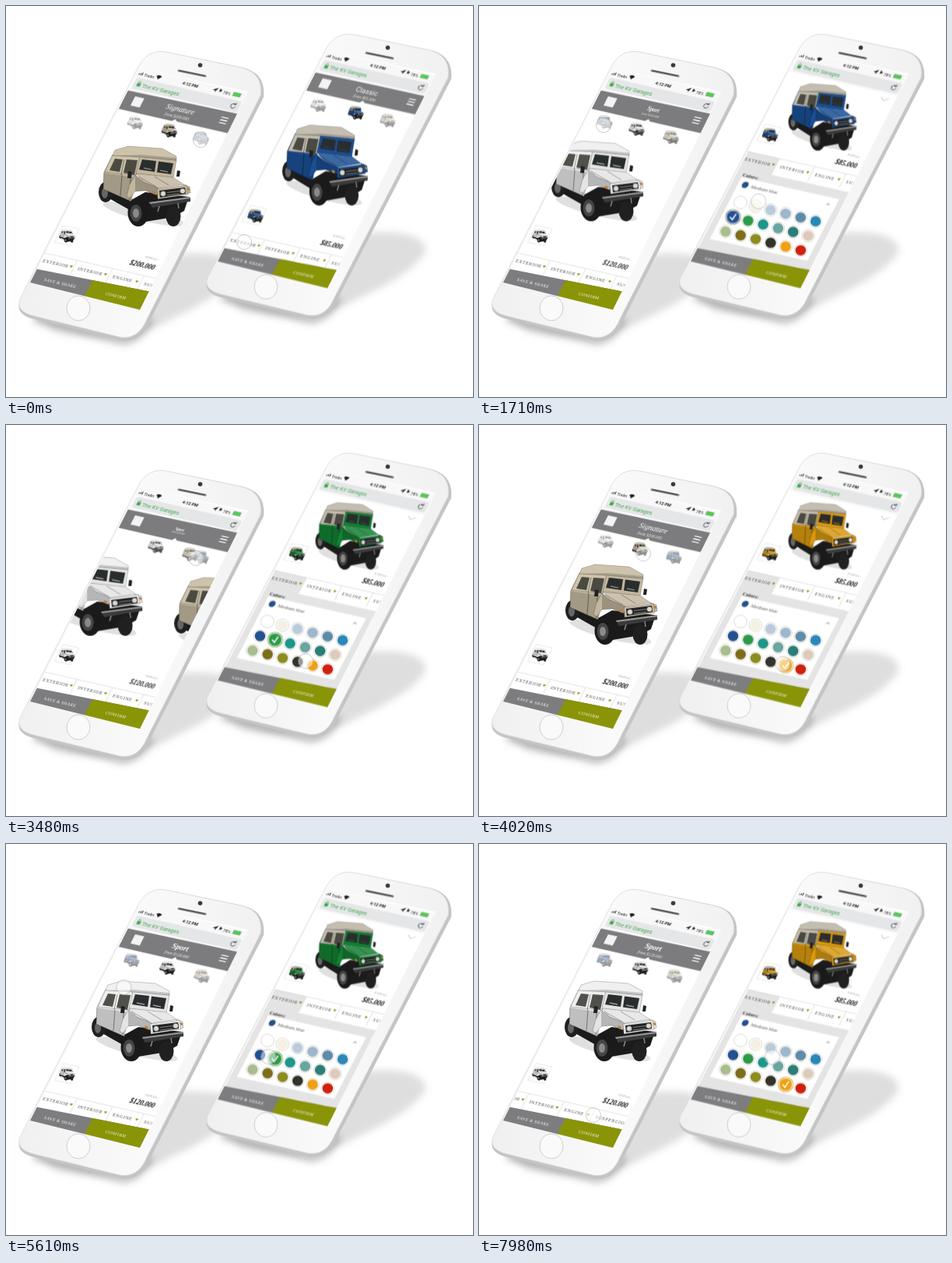
Recreate the animation shown at these times as an HTML page. Size 600 by 502 pixels, loop 8000 ms.

```html
<!DOCTYPE html>
<html lang="en">
<head>
<meta charset="utf-8">
<title>Car configurator on two phones</title>
<style>
html, body { margin: 0; width: 100%; height: 100%; overflow: hidden; background: #fff; }
svg { display: block; width: 100vw; height: 100vh; }
text { font-family: "Liberation Serif", serif; }
.sans { font-family: Roboto, Arial, sans-serif; }
.mid { text-anchor: middle; }
.tab { font-size: 5.6px; letter-spacing: .8px; fill: #444; }
.btn { font-size: 5.2px; letter-spacing: .45px; fill: #fff; text-anchor: middle; }
.title { font-size: 9.5px; font-style: italic; font-weight: bold; fill: #fff; text-anchor: middle; }
.sub { font-size: 5.4px; font-style: italic; fill: #eee; text-anchor: middle; }
.price { font-size: 8.6px; font-style: italic; font-weight: bold; fill: #111; text-anchor: end; }
.label { font-size: 6.6px; font-weight: bold; fill: #333; }
.value { font-size: 6.5px; fill: #555; }
.hint { font-size: 5.4px; font-style: italic; fill: #c4c4c4; }
.beige { color: #c2b79e; --top: #cdc3ab; }
.white { color: #e4e4e4; --top: #f0f0f0; }
.blue { color: #1b4f94; --top: #c4beb0; }
.panel { fill: currentColor; stroke: #000; stroke-opacity: .3; stroke-width: .7; }
.touch { fill: #fff; fill-opacity: .5; stroke: #aaa; stroke-opacity: .75; stroke-width: .8; }

.cars, .thumbs, .side, .sport, .signature, .first, .second, .strip, .hand1, .hand2,
.lift, .hero, .away, .reveal, .paint, .menu, .pick { animation: 8s linear infinite; }

.cars { animation-name: cars; }
@keyframes cars {
  0% { transform: translate(-150px, -24px); animation-timing-function: ease-out; }
  1.9%, 15.6% { transform: translate(-158px, -25px); animation-timing-function: ease-in-out; }
  23.1%, 40.5% { transform: none; animation-timing-function: ease-in-out; }
  48%, 62.5% { transform: translate(-158px, -25px); animation-timing-function: ease-in-out; }
  70%, 100% { transform: none; }
}
.thumbs { animation-name: thumbs; }
@keyframes thumbs {
  0% { transform: translate(-41.5px, -9.5px); animation-timing-function: ease-out; }
  1.9%, 15.6% { transform: translate(-44.5px, -10.2px); animation-timing-function: ease-in-out; }
  23.1%, 40.5% { transform: none; animation-timing-function: ease-in-out; }
  48%, 62.5% { transform: translate(-44.5px, -10.2px); animation-timing-function: ease-in-out; }
  70%, 100% { transform: none; }
}
.side { animation-name: side; animation-timing-function: step-end; }
@keyframes side {
  0%, 42% { transform: translate(89px, 20.4px); }
  18%, 64.5%, 100% { transform: none; }
}
.first { animation-name: first; }
@keyframes first {
  0%, 15.6%, 48%, 62.5% { opacity: var(--off); }
  23.1%, 40.5%, 70%, 100% { opacity: 1; }
}
.second { animation-name: second; }
@keyframes second {
  0%, 15.6%, 48%, 62.5% { opacity: 1; }
  23.1%, 40.5%, 70%, 100% { opacity: var(--off); }
}
.sport { animation-name: sport; }
@keyframes sport {
  0%, 19.4%, 44.3%, 66.1% { transform: scale(.4); opacity: 0; }
  19.5%, 44.2%, 66.2% { transform: scale(.4); opacity: 1; }
  23.1%, 40.5%, 70%, 100% { transform: none; opacity: 1; }
}
.signature { animation-name: signature; }
@keyframes signature {
  0%, 15.6%, 48%, 62.5% { transform: none; opacity: 1; }
  19.4%, 44.3%, 66.1% { transform: scale(.4); opacity: 1; }
  19.5%, 44.2%, 66.2%, 100% { transform: scale(.4); opacity: 0; }
}
.strip { animation-name: strip; }
@keyframes strip {
  0%, 91.9% { transform: none; }
  100% { transform: translate(-29px, 0); }
}
.hand1 { animation-name: hand1; }
@keyframes hand1 {
  0%, 3.7% { transform: translate(250px, 172px); }
  11.25% { transform: translate(177px, 162px); }
  14.4%, 28.7% { transform: translate(160px, 153px); }
  39.4%, 45% { transform: translate(244px, 171px); }
  59.4%, 67.5% { transform: translate(154px, 155px); }
  84.75% { transform: translate(137px, 344px); }
  89.4%, 91.9% { transform: translate(174px, 353px); }
  100% { transform: translate(146px, 348px); }
}
.hand2 { animation-name: hand2; }
@keyframes hand2 {
  0%, 3.1% { transform: translate(306px, 303px); }
  11.25% { transform: translate(332px, 285px); }
  15.6%, 18.7% { transform: translate(365px, 240px); }
  27.5%, 31.2% { transform: translate(346px, 275px); }
  43.5% { transform: translate(385px, 303px); }
  45.6%, 49.4% { transform: translate(393px, 309px); }
  60% { transform: translate(361px, 282px); }
  62%, 65% { transform: translate(346px, 275px); }
  76%, 85% { transform: translate(327px, 271px); }
  91.2%, 94.4% { transform: translate(393px, 309px); }
  100% { transform: translate(376px, 272px); }
}
.lift { animation-name: lift; }
@keyframes lift {
  0%, 3.1% { transform: none; animation-timing-function: ease-in-out; }
  9.4%, 100% { transform: translate(0, -108px); }
}
.hero { animation-name: hero; }
@keyframes hero {
  0%, 3.1% { transform: translate(112px, 176px) scale(.93, 1.02); animation-timing-function: ease-in-out; }
  9.4%, 100% { transform: translate(155px, 122px) scale(.74, .85); }
}
.away { animation-name: away; }
@keyframes away {
  0%, 3.1% { transform: none; opacity: 1; }
  8%, 100% { transform: translate(0, -24px); opacity: 0; }
}
.reveal { animation-name: reveal; }
@keyframes reveal { 0%, 6% { opacity: 0; } 9.4%, 100% { opacity: 1; } }
.menu { animation-name: menu; }
@keyframes menu { 0%, 17.5% { opacity: 0; } 20.5%, 100% { opacity: 1; } }
.paint { animation-name: paint; }
@keyframes paint {
  0%, 30%, 82%, 92.8% { color: #1b4f94; }
  32%, 46.2%, 64.5%, 80% { color: #148034; }
  48.2%, 62.5%, 94.8%, 100% { color: #d9990f; }
}
.pick { animation-timing-function: step-end; }
.pick.b { animation-name: pickBlue; }
.pick.g { animation-name: pickGreen; }
.pick.o { animation-name: pickOrange; }
@keyframes pickBlue { 0%, 80% { opacity: 1; } 30%, 93%, 100% { opacity: 0; } }
@keyframes pickGreen { 0%, 46.2%, 80%, 100% { opacity: 0; } 30%, 62.5% { opacity: 1; } }
@keyframes pickOrange { 0%, 62.5% { opacity: 0; } 46.2%, 93%, 100% { opacity: 1; } }
</style>
</head>
<body>
<svg viewBox="0 0 600 502">
<defs>
  <clipPath id="screen"><path d="M171 80L311 110L172 390L31 355Z"/></clipPath>
  <filter id="blur" x="-30%" y="-30%" width="160%" height="160%"><feGaussianBlur stdDeviation="5"/></filter>
  <linearGradient id="shell" x1="0" y1="0" x2="1" y2="0">
    <stop offset="0" stop-color="#f0f0f1"/><stop offset=".5" stop-color="#fafafa"/><stop offset="1" stop-color="#f1f1f2"/>
  </linearGradient>

  <g id="car">
    <ellipse cx="60" cy="88" rx="54" ry="9" transform="rotate(14 60 88)" opacity=".12"/>
    <path d="M8 54L44 70L62 60L118 66L112 84L98 92L62 98L44 84L12 66Z" fill="#1b1b1b"/>
    <ellipse cx="98" cy="91" rx="9.500" ry="13" fill="#202020"/>
    <ellipse cx="11" cy="60" rx="9" ry="13" fill="#202020"/>
    <ellipse cx="10" cy="61" rx="4" ry="7" fill="#666"/>
    <path class="panel" d="M20 12L54 14L49 46L44 72L8 56L9 34Z"/>
    <path class="panel" style="fill:var(--top)" d="M20 12L55 14L50 38L10 34Z"/>
    <path d="M8 35L48 41L44 72L8 56Z" opacity=".16"/>
    <path d="M23 17L33 18L29 34L16 32ZM38 18L52 19L48 38L34 35Z" fill="#35352f" opacity=".85"/>
    <path d="M32 38L30 65M35 18L31 38M43 42L42 70" stroke="#000" stroke-opacity=".4" fill="none"/>
    <path class="panel" d="M55 14L102 19L98 42L50 36Z"/>
    <path d="M58 18L76 20L74 34L54 31ZM79 20.500L98 23L95 37L77 34.500Z" fill="#2a2d2e"/>
    <path d="M60 29L70 31M81 32L91 34" stroke="currentColor" stroke-width="1.500" opacity=".6"/>
    <path class="panel" style="fill:var(--top)" d="M20 13L23 6L40 1L84 4L102 14L102 19L56 15Z"/>
    <path d="M20 13L56 15L102 19L102 16L56 12Z" opacity=".18"/>
    <path class="panel" d="M50 36L98 41L111 50L79 55L60 47Z"/>
    <path d="M50 36L98 41L111 50L79 55L60 47Z" fill="#fff" opacity=".14"/>
    <path d="M74 40L92 51M53 40L76 53" stroke="#000" stroke-opacity=".3"/>
    <path class="panel" d="M49 38L60 47L79 55L77 64L62 58L49 59L42 68L38 65L42 50Z"/>
    <path d="M49 38L60 47L79 55L77 64L62 58L49 59Z" opacity=".2"/>
    <path class="panel" d="M111 50L119 53L120 61L113 62Z"/>
    <path class="panel" d="M77 56L115 51L117 63L78 69Z"/>
    <path d="M80 58L113 54L114 62L81 67Z" fill="#222"/>
    <path d="M90 60.500L106 58.500M90 64L106 62" stroke="#999" stroke-width=".8"/>
    <circle cx="85" cy="62" r="3.600" fill="#d9d9d4" stroke="#444"/>
    <circle cx="110" cy="58.500" r="3.600" fill="#d9d9d4" stroke="#444"/>
    <path d="M71 58L75 60L74 63L70 61ZM116 54L119 55L119 58L116 57Z" fill="#c87a30"/>
    <path d="M67 73L120 66L120 72L71 80Z" fill="#3b3b3b"/>
    <path d="M67 73L120 66L120 68L68 75Z" fill="#999"/>
    <path d="M80 78L78 85M104 74L105 81" stroke="#888" stroke-width="1.500"/>
    <ellipse cx="53" cy="86" rx="13.500" ry="18" fill="#1a1a1a"/>
    <ellipse cx="50" cy="87" rx="7.500" ry="11" fill="#454545"/>
    <ellipse cx="50" cy="87" rx="4" ry="6" fill="#8a8a88"/>
    <path d="M40 33L45 34L44 42L39 42ZM103 32L107 33L106 40L102 40Z" fill="#222"/>
  </g>
  <use id="mini" href="#car" transform="translate(-10 -9) scale(.17)"/>

  <g id="body">
    <path d="M18 378L170 79Q182 55 206 59L304 79Q334 86 331 117L186 402Q175 432 149 430L36 402Q11 396 18 378Z" fill="#c3c4c6"/>
    <path d="M18 376L170 78Q182 55 206 59L302 79Q331 86 327 115L181 402Q170 429 146 425L36 398Q12 392 18 376Z" fill="url(#shell)" stroke="#d9dadc" stroke-width=".8"/>
    <circle cx="249.500" cy="76" r="2.800" fill="#333a45"/>
    <path d="M222 83L256 90" stroke="#8b8b8e" stroke-width="3" stroke-linecap="round"/>
    <path d="M223 83L255 89.500" stroke="#444" stroke-width="1.200" stroke-linecap="round"/>
    <ellipse cx="93" cy="388" rx="15" ry="16" fill="#fafafa" stroke="#cfcfd1"/>
    <path d="M171 80L311 110L172 390L31 355Z" fill="#fff"/>
  </g>
  <g id="shadow" filter="url(#blur)">
    <path d="M40 400L225 318Q300 314 298 343Q280 372 212 402Q150 440 60 418Z" fill="#777" opacity=".24"/>
    <path d="M36 401L149 430Q170 430 186 402" fill="none" stroke="#555" stroke-width="9" opacity=".4"/>
  </g>

  <g id="browser">
    <path d="M0 0H146V28H0Z" fill="#f8f8f8"/>
    <g class="sans" fill="#222" font-size="5.400">
      <path d="M3 6h1v1.500h-1zM5 5h1v2.500h-1zM7 4h1v3.500h-1z"/>
      <text x="10" y="8" class="sans">Trelin</text>
      <path d="M25 4Q28.500 1.500 32 4L28.500 8Z"/>
      <text x="70" y="7.500" class="sans mid" font-weight="bold">4:12 PM</text>
      <path d="M100 5L105 2L103 7L102.500 5ZM108 2L111 4L108 6M111 6L108 4" stroke="#222" stroke-width=".5"/>
      <text x="113" y="7" class="sans">78%</text>
    </g>
    <path d="M126 2.500h9.500v4.500h-9.500z" fill="#4cd04f" stroke="#777" stroke-width=".4"/>
    <rect x="3" y="11.500" width="138" height="14" rx="3" fill="#e5e6e8"/>
    <path d="M7 17.500h4.500v4h-4.500z" fill="#41a94b"/>
    <path d="M8 17.500v-1.500q1.300-2 2.600 0v1.500" fill="none" stroke="#41a94b" stroke-width=".8"/>
    <text x="14" y="21.500" class="sans" font-size="6.800" fill="#41a94b">The KV Garages</text>
    <path d="M135 16.500A3 3 0 1 0 136 19.500M135.500 14.500V17H133" fill="none" stroke="#333" stroke-width=".8"/>
  </g>
  <g id="header">
    <path d="M0 29L146 27V52.500H76L73 50L70 53H0Z" fill="#7c7b7d"/>
    <rect x="12" y="34" width="12" height="12" fill="#f3f3f3"/>
    <path d="M126 35h9M126 38.500h9M126 42h9" stroke="#fff" stroke-width="1.200"/>
  </g>
  <g id="info">
    <path d="M4 205h21v22h-21z" fill="#fff" stroke="#ddd" stroke-width=".6"/>
    <text x="137" y="221" font-size="4.300" letter-spacing=".5" text-anchor="end" fill="#888">TOTAL:</text>
  </g>
  <g id="tabs">
    <path d="M-40 242.500H200M41.500 242V263M88 242V262M129 242V261" stroke="#ddd" stroke-width=".8"/>
    <g class="tab">
      <text x="1" y="253.500">EXTERIOR</text><text x="47" y="253.500">INTERIOR</text>
      <text x="93" y="253.500">ENGINE</text><text x="134" y="253.500">SUSPENCION</text>
    </g>
    <path d="M36 250h4l-2 3zM81 250h4l-2 3zM122 250h4l-2 3z" fill="#8a9407"/>
  </g>
  <g id="buttons">
    <path d="M-2 263.500L146 259.500V288H-2Z" fill="#7d7c7f"/>
    <path d="M71 261.500L146 259.500V288H71Z" fill="#8a9407"/>
    <text x="35" y="275.500" class="btn">SAVE &amp; SHARE</text>
    <text x="108" y="275.500" class="btn">CONFIRM</text>
  </g>
</defs>

<use href="#shadow"/>
<use href="#shadow" x="241" y="-27"/>

<g>
  <use href="#body"/>
  <g clip-path="url(#screen)">
    <g class="cars">
      <use href="#car" class="white" x="108" y="175"/>
      <use href="#car" class="beige" x="267" y="203"/>
    </g>
    <g class="side"><use href="#mini" class="blue" x="161" y="149" opacity=".45"/></g>
    <g class="thumbs" style="--off:.45">
      <g class="first"><use href="#mini" class="white" x="207" y="159"/></g>
      <g class="second"><use href="#mini" class="beige" x="251" y="169.500"/></g>
    </g>
    <g transform="matrix(.979 .224 -.495 .979 171 80)">
      <use href="#browser"/>
      <use href="#header"/>
      <g transform="translate(73 40)">
        <g class="sport"><text class="title">Sport</text><text class="sub" y="8.500">from $120.000</text></g>
        <g class="signature"><text class="title" style="font-weight:normal">Signature</text><text class="sub" y="8.500">from $200.000</text></g>
      </g>
      <use href="#info"/>
      <g style="--off:0">
        <text x="137" y="233.500" class="price first">$120.000</text>
        <text x="137" y="233.500" class="price second">$200.000</text>
      </g>
      <g class="strip"><use href="#tabs"/></g>
      <use href="#buttons"/>
    </g>
    <use href="#mini" class="white" x="78" y="295"/>
  </g>
</g>

<g transform="matrix(1 0 0 .984 241 -21.4)">
  <use href="#body"/>
  <g clip-path="url(#screen)">
    <g class="away">
      <use href="#mini" class="white" x="160" y="151" opacity=".45"/>
      <use href="#mini" class="blue" x="208" y="161"/>
      <use href="#mini" class="beige" x="249" y="171" opacity=".45"/>
    </g>
    <g class="hero"><g class="blue"><g class="paint"><use href="#car"/></g></g></g>
    <g transform="matrix(.979 .224 -.495 .979 171 80)">
      <g class="away">
        <use href="#header"/>
        <text x="72" y="40.500" class="sans mid" font-size="8.800" fill="#fff">Classic</text>
        <text x="73" y="48.500" class="sub">from $85.000</text>
      </g>
      <use href="#browser"/>
      <path class="reveal" d="M124 33l5 4.500l5-4.500" fill="none" stroke="#bbb" stroke-width=".9"/>
      <g class="lift">
        <use href="#info"/>
        <g transform="translate(15.500 216.500) matrix(.916 -.21 .463 .916 0 0)"><g class="blue"><g class="paint"><use href="#mini"/></g></g></g>
        <text x="137" y="233.500" class="price">$85.000</text>
        <g class="reveal">
          <path d="M0 242H41.500V264H146V400H0Z" fill="#e4e4e5"/>
          <path d="M8 275h128v17h-128zM8 308h128v17h-128zM8 341h128v17h-128z" fill="#fff"/>
          <text x="8" y="273" class="label">Colors:</text>
          <text x="8" y="305" class="label">Tops:</text>
          <text x="8" y="338" class="label">Base:</text>
          <text x="13" y="317.500" class="value">Soft-top <tspan class="hint">(included)</tspan></text>
          <text x="13" y="350.500" class="value">Short base <tspan class="hint">(included)</tspan></text>
          <path d="M124 282h4l-2 3zM124 315h4l-2 3zM124 348h4l-2 3z" fill="#8a9407"/>
          <path class="menu" d="M0 293H146V400H0Z" fill="#e4e4e5"/>
          <g class="menu">
            <path d="M8 275h128v82h-128z" fill="#fff"/>
            <path d="M124 285l2-2.500l2 2.500" fill="none" stroke="#777" stroke-width=".8"/>
          </g>
          <circle cx="17" cy="283" r="4" fill="#24508f"/>
          <text x="25" y="285.500" class="value">Medium blue</text>
        </g>
        <use href="#tabs"/>
      </g>
    </g>
    <g class="menu" id="swatches"></g>
    <use href="#buttons" transform="matrix(.979 .224 -.495 .979 171 80)"/>
  </g>
</g>

<g class="hand1"><circle class="touch" r="9.500"/></g>
<g class="hand2"><circle class="touch" r="9.500"/></g>
</svg>
<script>
const palette = [
  ['#ffffff', '#f4f1e4', '#bccbdc', '#9db7cc', '#5f8bab', '#2a87b8'],
  ['#24508f', '#2d9a4a', '#1f968a', '#6aa5a0', '#2b7d77', '#decabb'],
  ['#a9bd8f', '#7c6d1b', '#8d8c20', '#33332c', '#f0a014', '#d0210f']
];
const picks = { '#24508f': 'b', '#2d9a4a': 'g', '#f0a014': 'o' };

function swatch(color, row, col) {
  const x = 95 + 19.3 * col - 9.6 * row;
  const y = 278 + 4.9 * col + 19 * row;
  const mark = picks[color] ? `<g class="pick ${picks[color]}">
    <circle r="10" fill="${color}" stroke="#d9d29a"/>
    <circle r="8.600" fill="none" stroke="#fff"/>
    <path d="M-4 0L-1 3.500L4-4" fill="none" stroke="#fff" stroke-width="1.600"/></g>` : '';
  return `<g transform="translate(${x} ${y})">
    <circle r="8.300" fill="#fff" stroke="#d6d3cb" stroke-width=".8"/>
    <circle r="6.800" fill="${color}"/>${mark}</g>`;
}

document.getElementById('swatches').innerHTML =
  palette.map((colors, row) => colors.map((c, col) => swatch(c, row, col)).join('')).join('');
</script>
</body>
</html>
```
